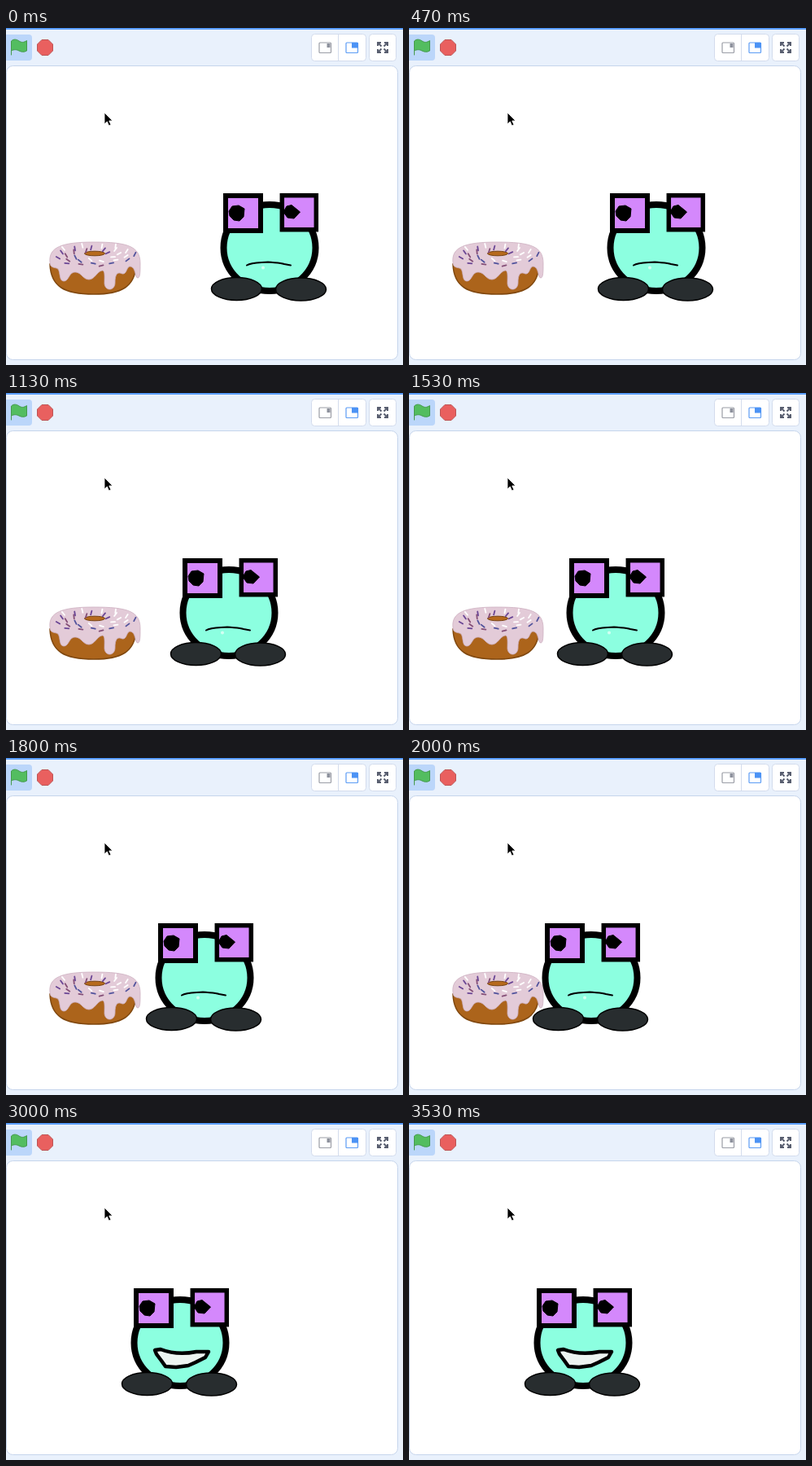
Recreate the animation shown at these times as an HTML page. Size 488x414 px, loop 3.59 s.

```html
<!DOCTYPE html>
<html lang="en">
<head>
<meta charset="utf-8">
<title>Doughnut snack</title>
<style>
  html, body { margin: 0; width: 100%; height: 100%; overflow: hidden; background: #e9f1fc; }
  svg { display: block; }
</style>
</head>
<body>
<svg width="488" height="414" viewBox="0 0 488 414">
  <!-- toolbar -->
  <rect width="488" height="414" fill="#e9f1fc"/>
  <rect width="488" height="2" fill="#5a9df8"/>
  <rect x="-4" y="8" width="36" height="32" rx="4" fill="#bbd6fa"/>
  <path d="M6.500 33V16C10 13 13 14 16 16S22 18 25.500 15.500V28C22 30 19 29.500 16 28S10 26 6.500 28"
        fill="#53bd60" stroke="#459a4c" stroke-linecap="round" stroke-linejoin="round"/>
  <path d="M44 14.500H52L57.500 20V28L52 33.500H44L38.500 28V20Z" fill="#e9605f" stroke="#bd5556" stroke-linejoin="round"/>
  <g fill="#fff" stroke="#d3dced">
    <rect x="375.500" y="7.500" width="67" height="33" rx="4"/>
    <path d="M408.500 8V40"/>
    <rect x="446.500" y="7.500" width="33" height="33" rx="4"/>
  </g>
  <rect x="385" y="18" width="14.500" height="12.500" rx="1" fill="none" stroke="#9a9da6" stroke-width="1.200"/>
  <rect x="394.500" y="19" width="4" height="5" fill="#8d919c"/>
  <rect x="418" y="18" width="14.500" height="12.500" rx="1" fill="#fff" stroke="#5b9cf5" stroke-width="1.200"/>
  <rect x="425" y="18" width="8" height="6.500" fill="#4c93f5"/>
  <g fill="none" stroke="#595f70" stroke-width="2">
    <path d="M457 22V18H461M465 18H469V22M469 26V30H465M461 30H457V26"/>
    <path d="M457 18L461.500 22.500M469 18L464.500 22.500M469 30L464.500 25.500M457 30L461.500 25.500"/>
  </g>

  <rect x=".5" y="46.500" width="481" height="361" rx="8" fill="#fff" stroke="#c6d5ec"/>

  <g id="donut">
    <path d="M54 290C55 318 72 327 108 327C142 327 158 318 160 292Z" fill="#ac641b" stroke="#80480f" stroke-width="1.500"/>
    <path d="M54 288C52 269 69 263 108 263C149 263 165 268 165 289C165 299 165 307 162 307C158 307 160 294 153 293
             C148 292 149 303 143 302C137 299 134 302 134 313C134 323 122 324 121 314C121 306 122 297 118 298
             C112 299 109 309 102 309C95 309 93 301 86 300C77 299 78 311 71 311C64 311 68 296 62 295C57 294 54 293 54 288Z"
          fill="#e3cbd8" stroke="#cdb0c1" stroke-width=".8"/>
    <ellipse cx="109" cy="277" rx="12.500" ry="2.800" fill="#b66a1e" stroke="#74400f"/>
    <g id="sprinkles" stroke-width="1.800" stroke-linecap="round"/>
  </g>

  <g id="hero">
    <ellipse cx="324" cy="270" rx="56.500" ry="53" fill="#8cffe0" stroke="#000" stroke-width="8"/>
    <g fill="#d488fc" stroke="#000" stroke-width="6">
      <rect x="270" y="206" width="43" height="43"/>
      <rect x="339.300" y="205.700" width="42" height="42" stroke-width="5.500"/>
    </g>
    <path d="M274 225L278 219L286 218L293 222L292 232L287 237L280 236L275 231Z
             M341 226L345 219L351 217.500L361.500 226L354 234L346 233Z"
          stroke="#000" stroke-linejoin="round"/>
    <g id="frown">
      <path d="M296 291.500C302 288 312 288.500 322 287.500C331 288.500 337 288 342 290L350 291.500"
            fill="none" stroke="#000" stroke-width="2" stroke-linecap="round"/>
      <circle cx="316" cy="294.500" r="2" fill="#d3fff2"/>
    </g>
    <path id="smile" d="M293 279L300 278C313 283 329 284 344 281L359 281L355 288L343 294L334 298L319 300L306 299L301 292L295 284Z"
          fill="#edf4f1" stroke="#000" stroke-width="4.500" stroke-linejoin="round"/>
    <g fill="#282d2f" stroke="#000" stroke-width="1.500">
      <ellipse cx="283.500" cy="320.500" rx="31" ry="14"/>
      <ellipse cx="362.500" cy="321" rx="31" ry="14"/>
    </g>
  </g>

  <path d="M121 104V118L124.300 115L126.500 120L129 119L126.800 114H131Z" stroke="#fff" stroke-width=".8"/>
</svg>
<script>
const LOOP = 3590, EAT = 2530;
const STRIDE = 10, STRIDES = 11;
const FPS = 15, FIRST = 3.76, GAP = 2.91; // first stride and spacing, in ticks
const get = id => document.getElementById(id);
const hero = get("hero"), donut = get("donut"), frown = get("frown"), smile = get("smile");

// Sprinkles spiral out by the golden angle around the hole.
const COLORS = ["#6a4695", "#fff", "#855078", "#fff", "#51539c"];
const COUNT = 36;
for (let i = 5; i < COUNT; i++) {
  const r = Math.sqrt(i / COUNT), a = i * 2.4;
  const x = 109 + 51 * r * Math.cos(a), y = 279 + 14 * r * Math.sin(a);
  get("sprinkles").innerHTML +=
    `<path d="M-2.500 0H2.500" transform="translate(${x} ${y}) rotate(${i * 67})" stroke="${COLORS[i % COLORS.length]}"/>`;
}

const show = (el, on) => el.setAttribute("visibility", on ? "visible" : "hidden");

function draw(now) {
  const t = now % LOOP, eaten = t >= EAT;
  const tick = Math.floor(t * FPS / 1000);
  const strides = Math.floor((tick - FIRST) / GAP) + 1;
  const x = -STRIDE * Math.max(0, Math.min(STRIDES, strides));
  hero.setAttribute("transform", `translate(${x} 0)`);
  show(donut, !eaten);
  show(frown, !eaten);
  show(smile, eaten);
  requestAnimationFrame(draw);
}
draw(0);
</script>
</body>
</html>
```
